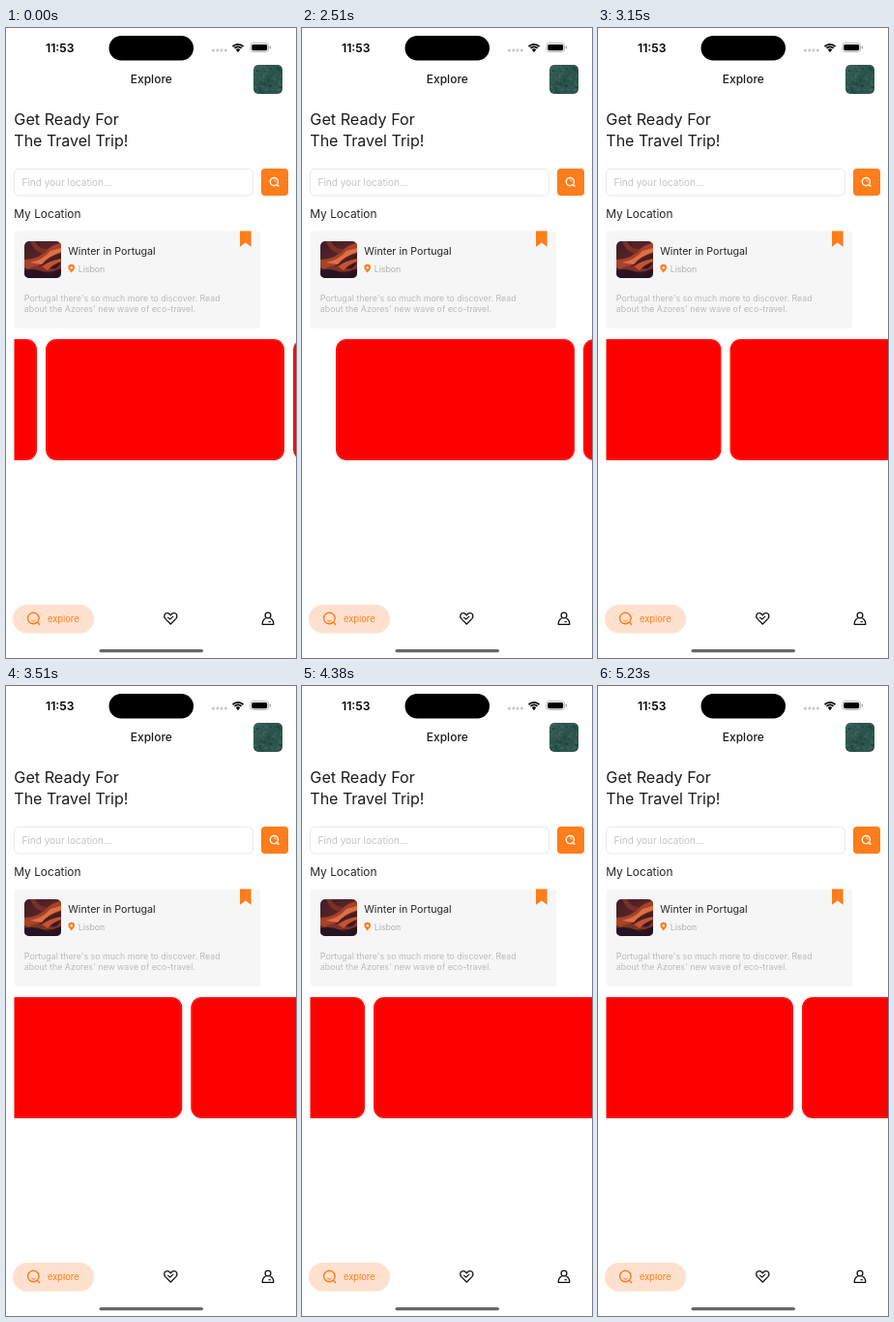
Animation, 300 px wide and 650 px high, one loop 5.26 s. Source, as an HTML page with a canvas:

```html
<!DOCTYPE html>
<html lang="en">
<head>
<meta charset="utf-8">
<title>Explore</title>
<style>
html, body { margin: 0; width: 100%; height: 100%; overflow: hidden; background: #fff; }
canvas { display: block; width: 300px; height: 650px; }
</style>
</head>
<body>
<canvas id="stage"></canvas>
<script>
const W = 300, H = 650, LOOP = 5260;
const ORANGE = '#ff7d1a', INK = '#1c1c1e';
const canvas = document.getElementById('stage');
const ctx = canvas.getContext('2d');
const scale = window.devicePixelRatio || 1;
canvas.width = W * scale;
canvas.height = H * scale;

function box(x, y, w, h, r, fill, line, width = 1) {
  ctx.beginPath();
  ctx.roundRect(x, y, w, h, r);
  if (fill) { ctx.fillStyle = fill; ctx.fill(); }
  if (line) { ctx.strokeStyle = line; ctx.lineWidth = width; ctx.stroke(); }
}

function text(str, x, y, size, color, weight = 400, align = 'left') {
  ctx.font = `${weight} ${size}px Inter, Roboto, sans-serif`;
  ctx.fillStyle = color;
  ctx.textAlign = align;
  ctx.fillText(str, x, y);
}

function path(d, fill, line, width = 1.3) {
  const p = new Path2D(d);
  if (fill) { ctx.fillStyle = fill; ctx.fill(p); }
  if (line) { ctx.strokeStyle = line; ctx.lineWidth = width; ctx.stroke(p); }
}

function dot(x, y, r, fill) {
  ctx.beginPath();
  ctx.arc(x, y, r, 0, 7);
  ctx.fillStyle = fill;
  ctx.fill();
}

function arc(x, y, r, from, to, color, width) {
  ctx.beginPath();
  ctx.arc(x, y, r, from * Math.PI, to * Math.PI);
  ctx.strokeStyle = color;
  ctx.lineWidth = width;
  ctx.stroke();
}

function clipped(x, y, w, h, r, draw) {
  ctx.save();
  ctx.beginPath();
  ctx.roundRect(x, y, w, h, r);
  ctx.clip();
  draw();
  ctx.restore();
}

function statusBar() {
  text('11:53', 41, 24.6, 12.2, '#000', 600);
  box(106.5, 8, 87.5, 25.5, 12.75, '#000');
  for (let i = 0; i < 4; i++) dot(214.4 + i * 4.3, 23, 1.5, '#c6c6c8');
  for (const r of [2.3, 5, 7.7]) arc(240, 24.5, r, 1.25, 1.75, '#000', 1.8);
  dot(240, 23.5, 1.2, '#000');
  box(252.8, 15.6, 18.8, 9, 2.8, null, '#a5a5a5', 0.8);
  box(254.2, 17, 16, 6.2, 1.6, '#000');
  box(272.7, 18.5, 1.2, 3.2, 0.6, '#a5a5a5');
}

function avatar() {
  clipped(256, 38, 30, 30, 5, () => {
    const g = ctx.createLinearGradient(256, 38, 286, 68);
    g.addColorStop(0, '#3b6159');
    g.addColorStop(0.5, '#28534b');
    g.addColorStop(1, '#345a53');
    ctx.fillStyle = g;
    ctx.fillRect(256, 38, 30, 30);
    let seed = 7;
    const rnd = () => (seed = seed * 16807 % 2147483647) / 2147483647;
    for (let i = 0; i < 90; i++) {
      const x = 256 + rnd() * 30, y = 38 + rnd() * 30;
      dot(x, y, 0.5 + rnd(), i % 2 ? 'rgba(15,45,40,.3)' : 'rgba(120,145,130,.18)');
    }
  });
}

function header() {
  text('Explore', 150.3, 57, 12, INK, 500, 'center');
  avatar();
  text('Get Ready For', 8.3, 100, 16.2, INK);
  text('The Travel Trip!', 8.3, 122, 16, INK);
  box(8.5, 145.5, 247, 27.5, 5, '#fff', '#e9e9ea');
  text('Find your location...', 16.5, 163, 10, '#c3c3c6');
  box(264, 145, 28, 28, 4, ORANGE);
  arc(277.4, 158.6, 4.1, 0, 2, '#fff', 1.3);
  arc(277.4, 158.6, 1.9, 1.5, 2, '#fff', 0.9);
  path('M280.5 161.7 L282.3 163.5', null, '#fff', 1.4);
  text('My Location', 8.3, 196.2, 11.9, '#252528');
}

function thumbnail() {
  clipped(19, 220, 38, 38, 5, () => {
    const g = ctx.createLinearGradient(19, 220, 50, 258);
    g.addColorStop(0, '#3d1d2a');
    g.addColorStop(0.5, '#5c2426');
    g.addColorStop(1, '#23121d');
    ctx.fillStyle = g;
    ctx.fillRect(19, 220, 38, 38);
    path('M19 239 Q32 239 40 231 T57 222 V232 Q43 236 35 244 T19 247Z', '#a64329');
    path('M25 242 Q39 239 46 230 L57 227 V231 Q44 235 37 244Z', '#df7043');
    path('M30 220 Q34 229 44 228 L39 233 Q29 231 25 220Z', '#7d3029');
    path('M19 251 Q32 242 43 247 T57 240 V248 Q47 253 37 251 T19 258Z', '#803126');
    path('M37 246 Q45 240 57 238 V241 Q48 244 43 250Z', '#c5532f');
    path('M19 250 Q31 247 41 253 T57 254 V258 H19Z', '#281420');
  });
}

function placeCard() {
  box(8.5, 209.5, 254.8, 100.5, 4, '#f6f6f7');
  path('M242 209.5 H253.6 V225.8 L247.8 221.5 L242 225.8Z', ORANGE);
  thumbnail();
  text('Winter in Portugal', 64.3, 233.6, 10.7, '#252528');
  path('M67.7 252.6 C65.6 250 64.3 248.9 64.3 247.1 A3.4 3.4 0 0 1 71.1 247.1 C71.1 248.9 69.8 250 67.7 252.6Z', ORANGE);
  dot(67.7, 247.2, 1.2, '#fff');
  text('Lisbon', 74.7, 251.5, 8.8, '#b1b1b3');
  text("Portugal there's so much more to discover. Read", 18.8, 282.3, 8.85, '#bbbbbd');
  text("about the Azores' new wave of eco-travel.", 18.8, 293, 8.85, '#bbbbbd');
}

function tabBar() {
  box(7, 595, 84, 29.5, 14.75, '#fde1ce');
  arc(28.3, 609, 5.8, 0, 2, ORANGE, 1.4);
  arc(28.3, 609, 3, 0.25, 0.75, ORANGE, 1);
  path('M32.5 613.2 L35 615.7', null, ORANGE, 1.5);
  text('explore', 43, 613, 9.3, ORANGE);
  path('M170.3 615 L164.9 609.6 C162.5 606.8 164 603.7 166.8 603.7 C168.6 603.7 169.6 604.7 170.3 605.8 C171 604.7 172 603.7 173.8 603.7 C176.6 603.7 178.1 606.8 175.7 609.6Z', null, '#111');
  path('M167.2 607.8 L169.7 610 L173.2 606.8', null, '#111', 1.1);
  arc(271, 606, 2.9, 0, 2, '#111', 1.3);
  path('M268.5 609.2 C266.3 610.2 265.2 612.4 265.2 615.3 H276.8 C276.8 612.4 275.7 610.2 273.5 609.2', null, '#111');
  path('M271.5 612.7 H274', null, '#111', 1);
  box(96.5, 641, 107.5, 3.2, 1.6, '#68686a');
}

const CARD = 247, PITCH = 256, START = 1920, STEP = 25.66;

// Fling stops: time and position of the first card.
const FLING = [[3150, -887.5], [3900, -5067], [4380, -5814], [5230, -6189]];
const decay = ms => 1 - Math.exp(-ms / 500);

// Bounce at the list start, a pull to the left, then a decaying fling.
function firstCardX(t) {
  if (t < START) return 41 - PITCH;
  if (t < FLING[0][0]) {
    const u = t - START;
    const pull = Math.max(0, (t - 2896) / 254);
    return 8.5 + (3 * u - 13.5) * Math.exp(-0.00711 * u) - 896.6 * pull ** 3;
  }
  const i = t < FLING[1][0] ? 0 : t < FLING[2][0] ? 1 : 2;
  const [t0, x0] = FLING[i], [t1, x1] = FLING[i + 1];
  return x0 + (x1 - x0) * decay(t - t0) / decay(t1 - t0);
}

function carousel(t) {
  const first = firstCardX(t);
  clipped(8.5, 320, W - 8.5, 128, 0, () => {
    const k = Math.max(0, Math.floor((8 - first) / PITCH));
    for (let x = first + k * PITCH; x < W; x += PITCH) {
      box(x, 321, CARD, 125, 11, '#f00');
      box(x + 1, 322, CARD - 2, 123, 10, null, 'rgba(255,90,50,.55)', 0.6);
    }
  });
}

function stepTime(t) {
  if (t < START) return 0;
  const n = Math.min(129, Math.floor((t - START + 5.1) / STEP));
  return Math.round((START + n * STEP) / 10) * 10;
}

function frame(now) {
  ctx.setTransform(scale, 0, 0, scale, 0, 0);
  ctx.fillStyle = '#fff';
  ctx.fillRect(0, 0, W, H);
  ctx.lineJoin = 'round';
  statusBar();
  header();
  placeCard();
  carousel(stepTime((now - begin) % LOOP));
  tabBar();
  requestAnimationFrame(() => frame(performance.now()));
}

const begin = performance.now();
frame(begin);
</script>
</body>
</html>
```
